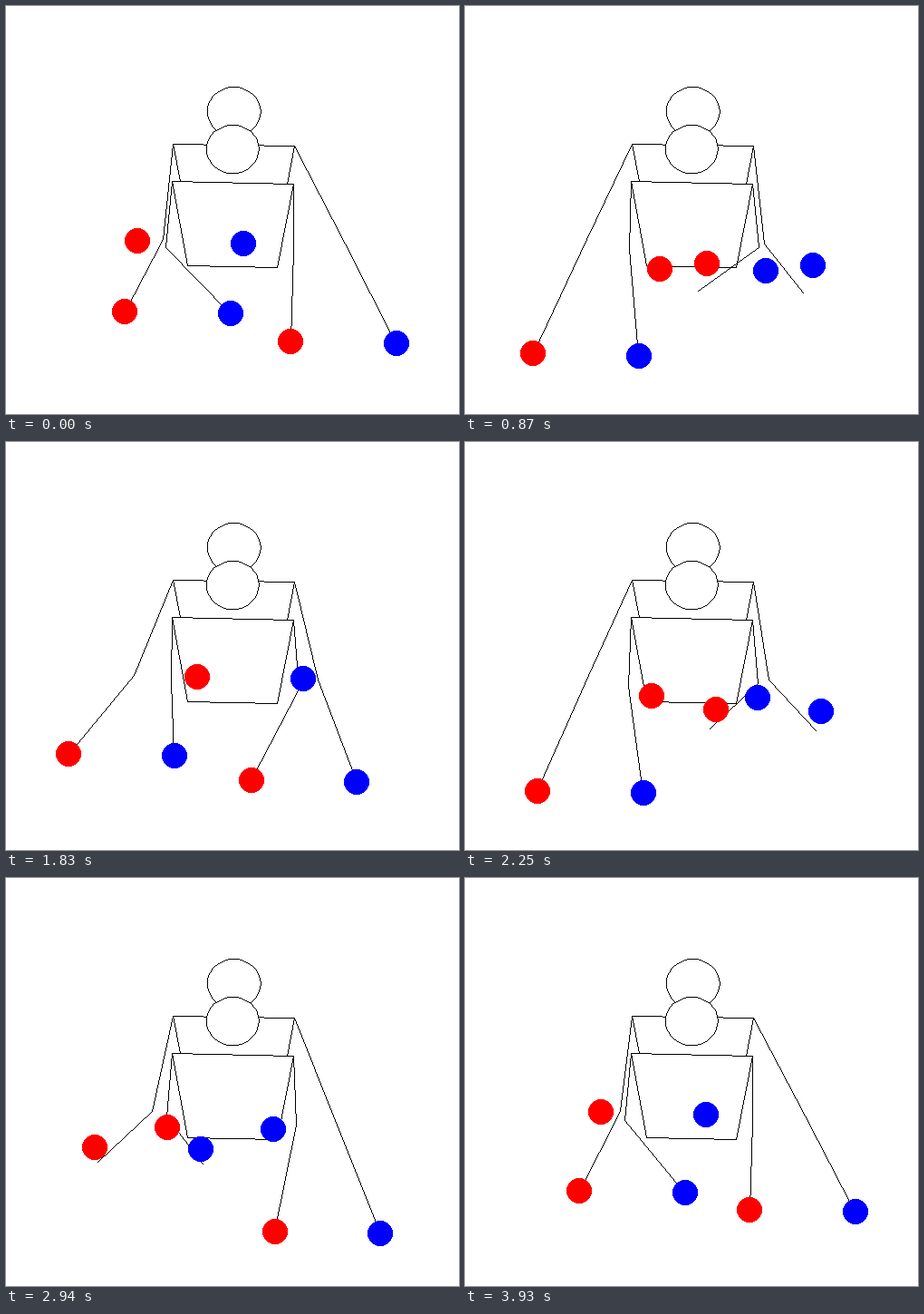
These frames come from a looping animation (500 by 450 pixels, 3960 ms). An HTML page with a canvas:

```html
<!DOCTYPE html>
<html lang="en">
<head>
<meta charset="utf-8">
<title>Two jugglers</title>
<style>
  html, body { margin: 0; width: 100%; height: 100%; overflow: hidden; background: #fff; }
  canvas { display: block; width: 500px; height: 450px; }
</style>
</head>
<body>
<canvas id="stage" width="500" height="450"></canvas>
<script>
const ctx = document.getElementById('stage').getContext('2d');
const STEP = 30;       // ms per step
const BEAT = 22;       // steps between throws
const CYCLE = 2 * BEAT;
const LOOP = 6 * BEAT;
const FLIGHT = 36;     // steps a ball spends in the air
const SPAN = 379.3;    // left x + right x of mirrored points
const TILT = 0.0222;   // the ground drops slightly to the right
const BLUE_SHIFT = { x: 116.6, y: 2.3 };
const LEFT = 0, RIGHT = 1;

// Hand path after a throw: step, x, y, x speed, y speed
const HAND_KEYS = [
  [0, 131, 334.1, 4.7, -8.6],
  [9.5, 105, 310.6, -7.5, 1.2],
  [14, 79.3, 322.6, -4.7, 8],
  [17, 69, 342.5, -1.9, 4.8],
  [22, 65.2, 363, 0.2, 4],
  [31.5, 81.2, 383.4, 2.5, 0.2],
  [40, 113, 362.2, 4.5, -5.2],
  [44, 131, 334.1, 4.7, -8.6]
];

function hermite(a, b, va, vb, span, u) {
  const u2 = u * u, u3 = u2 * u;
  return a * (2 * u3 - 3 * u2 + 1) + b * (3 * u2 - 2 * u3)
    + span * (va * (u3 - 2 * u2 + u) + vb * (u3 - u2));
}

// Maps a point given for the left side to the stage
function place(side, x, y) {
  const px = side === LEFT ? x : SPAN - x;
  return { x: px, y: y + TILT * px };
}

function handAt(side, s) {
  const i = HAND_KEYS.findIndex(k => k[0] > s);
  const a = HAND_KEYS[i - 1], b = HAND_KEYS[i];
  const span = b[0] - a[0], u = (s - a[0]) / span;
  return place(side,
    hermite(a[1], b[1], a[3], b[3], span, u),
    hermite(a[2], b[2], a[4], b[4], span, u));
}

// A ball flies from its thrower, then rests in the other hand
function ballAt(side, age) {
  if (age >= FLIGHT) return handAt(1 - side, age - BEAT);
  return place(side, 131 + 4.7 * age, 334.1 - 8.6 * age + 0.23 * age * age);
}

const shift = p => ({ x: p.x + BLUE_SHIFT.x, y: p.y + BLUE_SHIFT.y });

// Hard-edged drawing
function line(x0, y0, x1, y1) {
  x0 = Math.floor(x0); y0 = Math.floor(y0);
  const dx = Math.floor(x1) - x0, dy = Math.floor(y1) - y0;
  const n = Math.max(Math.abs(dx), Math.abs(dy), 1);
  ctx.fillStyle = '#000';
  for (let i = 0; i <= n; i++) {
    ctx.fillRect(Math.round(x0 + dx * i / n), Math.round(y0 + dy * i / n), 1, 1);
  }
}

function path(points) {
  for (let i = 1; i < points.length; i++) line(...points[i - 1], ...points[i]);
}

function disc(cx, cy, rx, ry, color) {
  ctx.fillStyle = color;
  cx = Math.round(cx); cy = Math.round(cy);
  for (let row = -Math.ceil(ry); row < ry; row++) {
    const k = (row + 0.5) / ry;
    if (Math.abs(k) >= 1) continue;
    const w = Math.round(rx * Math.sqrt(1 - k * k));
    ctx.fillRect(cx - w, cy + row, 2 * w, 1);
  }
}

function head(cx, cy, rx, ry) {
  disc(cx, cy, rx, ry, '#fff');
  const points = [];
  for (let i = 0; i <= 40; i++) {
    const a = i * Math.PI / 20;
    points.push([cx + rx * Math.cos(a), cy + ry * Math.sin(a)]);
  }
  path(points);
}

function bodies() {
  head(251.6, 116.3, 29.5, 27);
  path([[192, 193], [184, 152], [318, 154], [310, 196]]);
  path([[183, 193], [317, 196], [299, 288], [200, 286], [183, 193]]);
  head(250.2, 157.8, 29, 26.6);
}

// Reaches outward; straight once the hand is too far away
function outerArm(sx, sy, hand, dir, drop) {
  const out = (hand.x - sx) * dir, down = hand.y - sy;
  const slack = Math.sqrt(Math.max(0, 236 * 236 - out * out - down * down));
  const bend = (0.034 + 0.0021 * out) * slack;
  const elbow = out * drop / down - bend;
  path([[sx, sy], [sx + dir * elbow, sy + drop], [hand.x, hand.y]]);
}

// Reaches inward with the elbow hanging beside the body
function innerArm(sx, sy, hand, dir) {
  const inward = (hand.x - sx) * dir, down = hand.y - sy;
  const elbow = Math.min(7, 0.5 + 0.13 * Math.max(0, inward));
  const drop = 56 + 0.1 * down + 0.05 * inward;
  path([[sx, sy], [sx - dir * elbow, sy + drop], [hand.x, hand.y]]);
}

function draw(step) {
  ctx.fillStyle = '#fff';
  ctx.fillRect(0, 0, 500, 450);
  bodies();

  const left = handAt(LEFT, step % CYCLE);
  const right = handAt(RIGHT, (step + BEAT) % CYCLE);
  outerArm(184, 152, left, -1, 105.5);
  outerArm(318, 154, shift(right), 1, 108.5);
  innerArm(183, 193, shift(left), 1);
  innerArm(317, 196, right, -1);

  const balls = [0, 1, 2].map(k => {
    const beat = Math.floor(step / BEAT) - k;
    return ballAt(beat & 1, step - beat * BEAT);
  });
  balls.forEach(b => disc(b.x, b.y, 14, 14, '#f00'));
  balls.map(shift).forEach(b => disc(b.x, b.y, 14, 14, '#00f'));
}

function tick() {
  draw(Math.floor(performance.now() / STEP) % LOOP);
  requestAnimationFrame(tick);
}
tick();
</script>
</body>
</html>
```
